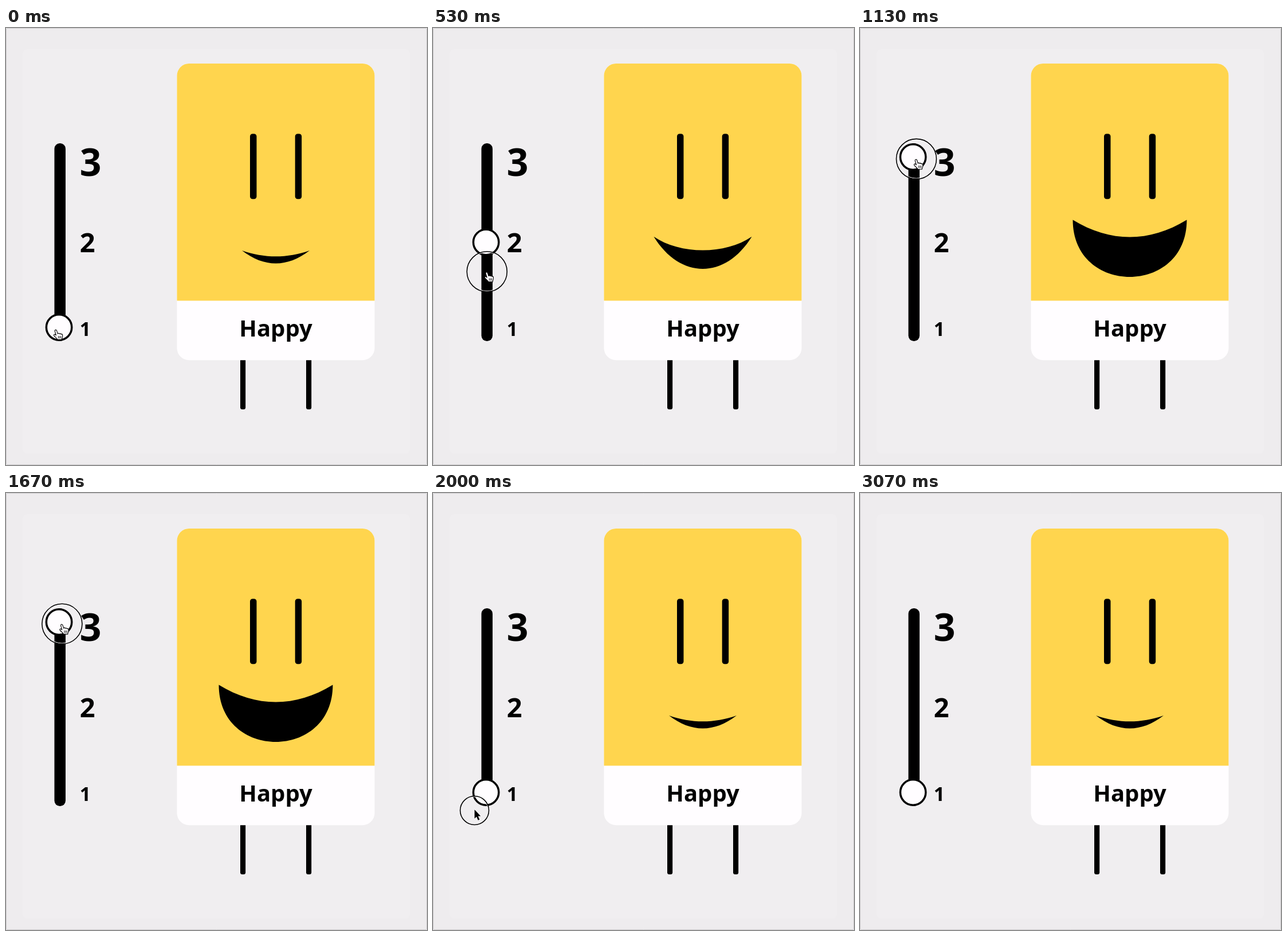
Write an HTML page with a canvas that moves like this. It is 735 px wide and 762 px high and loops after 3140 ms.

```html
<!DOCTYPE html>
<html lang="en">
<head>
<meta charset="utf-8">
<title>Mood slider</title>
<style>
  html, body { margin: 0; width: 100%; height: 100%; overflow: hidden; background: #eeecee; }
  canvas { display: block; }
</style>
</head>
<body>
<canvas id="stage" width="735" height="762"></canvas>
<script>
const ctx = document.getElementById('stage').getContext('2d');
const LOOP = 3140;
const STEP = 200 / 3;
const INK = '#000';
const WHITE = '#fffdff';
const MID = 471; // centre line of the card

// Times below are counted in steps
const PRESS = 4, RELEASE = 30, FADE = 33, GONE = 35;
const HOME = { x: 87.5, y: 525.5 };

const clamp = u => Math.min(1, Math.max(0, u));
const easeOut = u => 1 - (1 - u) ** 2;
const easeInOut = u => u * u * (3 - 2 * u);
const linear = u => u;

const MOVES = [
  { from: 5, to: 12, x: 97.5, y: 376, ease: easeOut },
  { from: 13, to: 18.5, x: 98.5, y: 216.5, ease: easeOut },
  { from: 24.5, to: 29, x: 81, y: 558.5, ease: easeInOut },
  { from: 29, to: 30, x: 72.5, y: 553.5, ease: linear }
];

// top, bottom: how far in the curve handles sit; smaller is rounder
const MOUTHS = [
  { half: 59, y: 388, mid: 398.3, low: 410.5, top: 0.33, bottom: 0.33 },
  { half: 85.6, y: 363.8, mid: 387.6, low: 420, top: 0.27, bottom: 0.27 },
  { half: 99.5, y: 334.5, mid: 364.5, low: 434, top: 0.33, bottom: 0 }
];

function box(x, y, w, h, r, color) {
  ctx.beginPath();
  ctx.roundRect(x, y, w, h, r);
  ctx.fillStyle = color;
  ctx.fill();
}

function ring(x, y, r, width, color, fill) {
  ctx.beginPath();
  ctx.arc(x, y, r, 0, Math.PI * 2);
  if (fill) { ctx.fillStyle = fill; ctx.fill(); }
  ctx.lineWidth = width;
  ctx.strokeStyle = color;
  ctx.stroke();
}

function label(text, x, y, size, align = 'left') {
  ctx.font = `bold ${size}px "Noto Sans", "Open Sans", sans-serif`;
  ctx.textAlign = align;
  ctx.fillStyle = INK;
  ctx.fillText(text, x, y);
}

function backdrop() {
  box(0, 0, 735, 762, 0, '#eeecee');
  box(29, 37, 676, 705, 8, '#f0eef0');
  ctx.strokeStyle = '#cbcacc';
  ctx.lineWidth = 1;
  ctx.beginPath();
  ctx.roundRect(0.5, 0.5, 734, 761, 2);
  ctx.stroke();
}

// Sagging curve from one mouth corner to the other; dir is 1 rightwards
function sag({ half, y }, depth, bend, dir) {
  const handle = half * (1 - 2 * bend) * dir;
  const h = y + (depth - y) * 4 / 3;
  ctx.bezierCurveTo(MID - handle, h, MID + handle, h, MID + half * dir, y);
}

function mouth(m) {
  ctx.beginPath();
  ctx.moveTo(MID - m.half, m.y);
  sag(m, m.mid, m.top, 1);
  sag(m, m.low, m.bottom, -1);
  ctx.fillStyle = INK;
  ctx.fill();
}

function figure(level) {
  for (const x of [409, 524]) box(x, 570, 9.2, 95, 3.5, INK);
  box(298.5, 62, 345, 517.2, 21, WHITE);
  box(298.5, 62, 345, 413.4, [21, 21, 0, 0], '#ffd54e');
  for (const x of [426, 504.7]) box(x, 184.5, 11.5, 113.7, 4.5, INK);
  mouth(MOUTHS[level]);
  label('Happy', MID, 537.5, 40, 'center');
}

function slider(level) {
  box(84.5, 201, 19.5, 345, 9.5, INK);
  label('3', 128.7, 258.2, 66);
  label('2', 128.7, 391, 47);
  label('1', 128.7, 537, 33.5);
  ring(92.6, 522 - 148.5 * level, 22.2, 3.5, INK, WHITE);
}

function outline(path, fill, stroke, width) {
  ctx.lineJoin = ctx.lineCap = 'round';
  ctx.fillStyle = fill;
  ctx.fill(path);
  ctx.strokeStyle = stroke;
  ctx.lineWidth = width;
  ctx.stroke(path);
}

const hand = new Path2D('M-1.7 2.2C-2.2-.2 .9-1 1.7 1.2L3.6 6.7C4.4 5.4 6.3 5.6 6.8 7' +
  'C7.8 5.9 9.3 6.3 9.7 7.7C10.8 6.8 12.3 7.4 12.4 9.2C12.8 12.3 12.2 13.7 11.2 15.4L11 17' +
  'H3.3C2.4 14.8-.4 13.1-3 10.4C-4.6 8.7-2.7 7-1.2 8L.5 9.3Z');
const creases = new Path2D('M4.9 11V14.5M7.2 11V14.5M9.4 11V14.5');
const arrow = new Path2D('M0-1.5V14.3L3.5 11L6.2 17.3L8.9 16.1L6.2 10H10.8Z');

function pointerAt(step) {
  let { x, y } = HOME;
  for (const m of MOVES) {
    const u = m.ease(clamp((step - m.from) / (m.to - m.from)));
    x += (m.x - x) * u;
    y += (m.y - y) * u;
  }
  const grow = clamp((step - PRESS) / 2);
  const shrink = clamp((RELEASE + 2.5 - step) / 3.5);
  return { x, y, r: 35 * grow * shrink };
}

function pointer({ x, y, r }, step) {
  if (step >= GONE) return;
  if (r > 2) {
    ring(x, y, r - 1.2, 1, WHITE);
    ring(x, y, r, 1.6, INK);
  }
  ctx.save();
  ctx.translate(x, y);
  if (step < RELEASE) {
    ctx.translate(-0.6, 0.9);
    ctx.scale(0.95, 1);
    outline(hand, WHITE, INK, 1.2);
    ctx.lineWidth = 0.9;
    ctx.stroke(creases);
  } else {
    ctx.globalAlpha = step < FADE ? 1 : (GONE - step) / 3;
    outline(arrow, INK, WHITE, 2);
    ctx.fill(arrow);
  }
  ctx.restore();
}

// Steps begin at multiples of 1/15 s, rounded to 10 ms
function stepAt(t) {
  const k = Math.floor((t + 4) / STEP);
  return Math.round(k * STEP / 10) * 10 > t ? k - 1 : k;
}

function draw(now) {
  const step = stepAt(now % LOOP);
  const p = pointerAt(step);
  const level = Math.round(clamp((522 - p.y) / 297) * 2);
  backdrop();
  figure(level);
  slider(level);
  pointer(p, step);
}

let start;
function tick(now) {
  start ??= now;
  draw(Math.max(0, now - start));
  requestAnimationFrame(tick);
}
draw(0);
requestAnimationFrame(tick);
</script>
</body>
</html>
```
